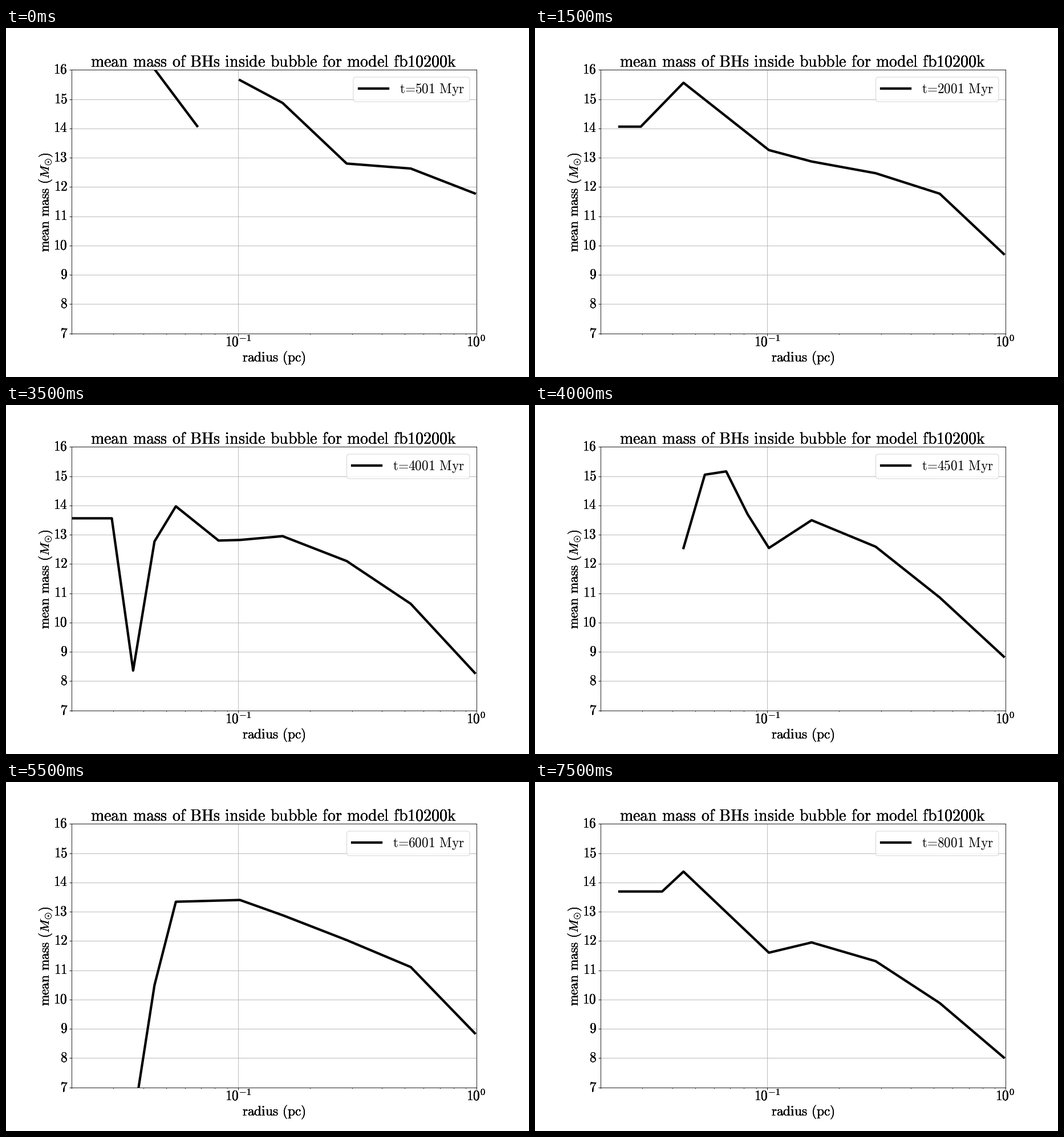
A matplotlib script that plays this animation: 917x611 px, repeating every 8000 ms.

```python
import numpy as np
import matplotlib.pyplot as plt
from matplotlib.animation import FuncAnimation
from matplotlib.patches import FancyBboxPatch
from matplotlib.ticker import NullFormatter

W, H, DPI = 917, 611, 64
STEPS, INTERVAL = 16, 500
LEFT, RIGHT, TOP, BOTTOM = 114.6, 825.3, 73.3, 534.6
DECADE = (RIGHT - LEFT) / np.log10(50)
BINS = np.arange(20)
OUTER = (8, 10, 13, 16, 19)

plt.rcParams["mathtext.fontset"] = "cm"


def pt(px):
    return px * 72 / DPI


FONT, TITLE = pt(23.35), pt(27.95)

# step: first filled bin, inner turning points {bin: mass}, masses at OUTER
KEYS = {
    0: (3, {3: 17, 6: 14.08}, (15.65, 14.87, 12.8, 12.63, 11.78)),
    3: (1, {2: 14.06, 4: 15.56}, (13.26, 12.87, 12.47, 11.77, 9.71)),
    5: (3, {3: 18, 5: 14.23, 6: 14.57}, (14.09, 14.01, 13.12, 11.56, 8.97)),
    7: (0, {2: 13.56, 3: 8.36, 4: 12.77, 5: 13.97, 7: 12.8},
        (12.82, 12.95, 12.1, 10.64, 8.28)),
    9: (3, {3: 4.67, 4: 12.32, 5: 16.13, 6: 16.94},
        (12.27, 14.04, 13.08, 11.07, 9.39)),
    11: (3, {3: 5.8, 4: 10.49, 5: 13.34}, (13.4, 12.88, 12.03, 11.11, 8.85)),
    15: (1, {3: 13.69, 4: 14.37}, (11.6, 11.95, 11.31, 9.88, 8.02)),
}


def key_profile(step):
    first, inner, outer = KEYS[step]
    y = np.interp(BINS, [*inner, *OUTER], [*inner.values(), *outer])
    return first, y


def profile(step):
    """Mean mass per bin; steps between keys blend their neighbours."""
    if step in KEYS:
        first, y = key_profile(step)
        if step == 0:
            y[7] = np.nan  # empty bin
    else:
        a = max(k for k in KEYS if k < step)
        b = min(k for k in KEYS if k > step)
        (fa, ya), (fb, yb) = key_profile(a), key_profile(b)
        mix = (step - a) / (b - a)
        first = round(fa + (fb - fa) * mix)
        y = np.minimum(ya + (yb - ya) * mix, 15.4)
        y[y < 8] = np.nan
    y[:first] = np.nan
    return y


fig = plt.figure(figsize=(W / DPI, H / DPI), dpi=DPI, facecolor="white")
ax = fig.add_axes([LEFT / W, 1 - BOTTOM / H,
                   (RIGHT - LEFT) / W, (BOTTOM - TOP) / H])
ax.set_xscale("log")
ax.set_xlim(0.02, 1)
ax.set_ylim(7, 16)
ax.set_yticks(range(7, 17))
for axis in (ax.xaxis, ax.yaxis):
    axis.set_major_formatter(NullFormatter())
    axis.set_minor_formatter(NullFormatter())
ax.tick_params(which="major", length=pt(3.7), width=pt(0.85))
ax.tick_params(which="minor", length=pt(2.1), width=pt(0.64))
ax.grid(True, color="#b0b0b0", linewidth=pt(0.85))
for spine in ax.spines.values():
    spine.set_linewidth(pt(0.85))

# Overlay in pixel coordinates for all lettering and the legend.
page = fig.add_axes([0, 0, 1, 1])
page.set_xlim(0, W)
page.set_ylim(H, 0)
page.axis("off")


def roman(s):
    return r"$\text{%s}$" % s


def put(x, y, s, size=FONT, ha="center", va="baseline", **kw):
    return page.text(x, y, s, fontsize=size, ha=ha, va=va, **kw)


def put_heavy(*args, **kw):
    # Stacked copies harden the antialiased edges.
    for _ in range(4):
        put(*args, **kw)


put_heavy(469.3, 67, roman("mean mass of BHs inside bubble for model fb10200k"),
          TITLE)
put_heavy(470, 584.5, roman("radius (pc)"))
put_heavy(76, 304.5, r"$\text{mean mass (}M_{\odot}\text{)}$",
          rotation=90, rotation_mode="anchor")
for v in range(7, 17):
    y = BOTTOM - (v - 7) * (BOTTOM - TOP) / 9
    put_heavy(107.8, y, roman(v), ha="right", va="center")
for x, power in ((406.5, -1), (824, 0)):
    put_heavy(x, 558, r"$\text{10}^{%d}$" % power)

radii = 10 ** ((110.6 + 37.44 * BINS - RIGHT) / DECADE)
curve, = ax.plot([], [], color="black", lw=pt(4.24))
box = FancyBboxPatch((597.5, 86), 215.5, 43,
                     boxstyle="round,pad=0,rounding_size=5",
                     fc=(1, 1, 1, 0.8), ec=(0.8, 0.8, 0.8, 0.8), lw=pt(1.06))
page.add_patch(box)
key, = page.plot([], [], color="black", lw=pt(4.24))
label = put(678.3, 114, "", ha="left")


def draw(step):
    curve.set_data(radii, profile(step))
    time = str(501 + 500 * step)
    x = 597.5 + 11.3 * (4 - len(time))
    box.set_x(x)
    box.set_width(813 - x)
    key.set_data([x + 9.7, x + 60.7], [105.5, 105.5])
    label.set_x(x + 80.8)
    label.set_text(roman(f"t={time} Myr"))
    return curve, box, key, label


anim = FuncAnimation(fig, draw, frames=STEPS, interval=INTERVAL,
                     repeat=True, repeat_delay=0, blit=False)
plt.show()
```
